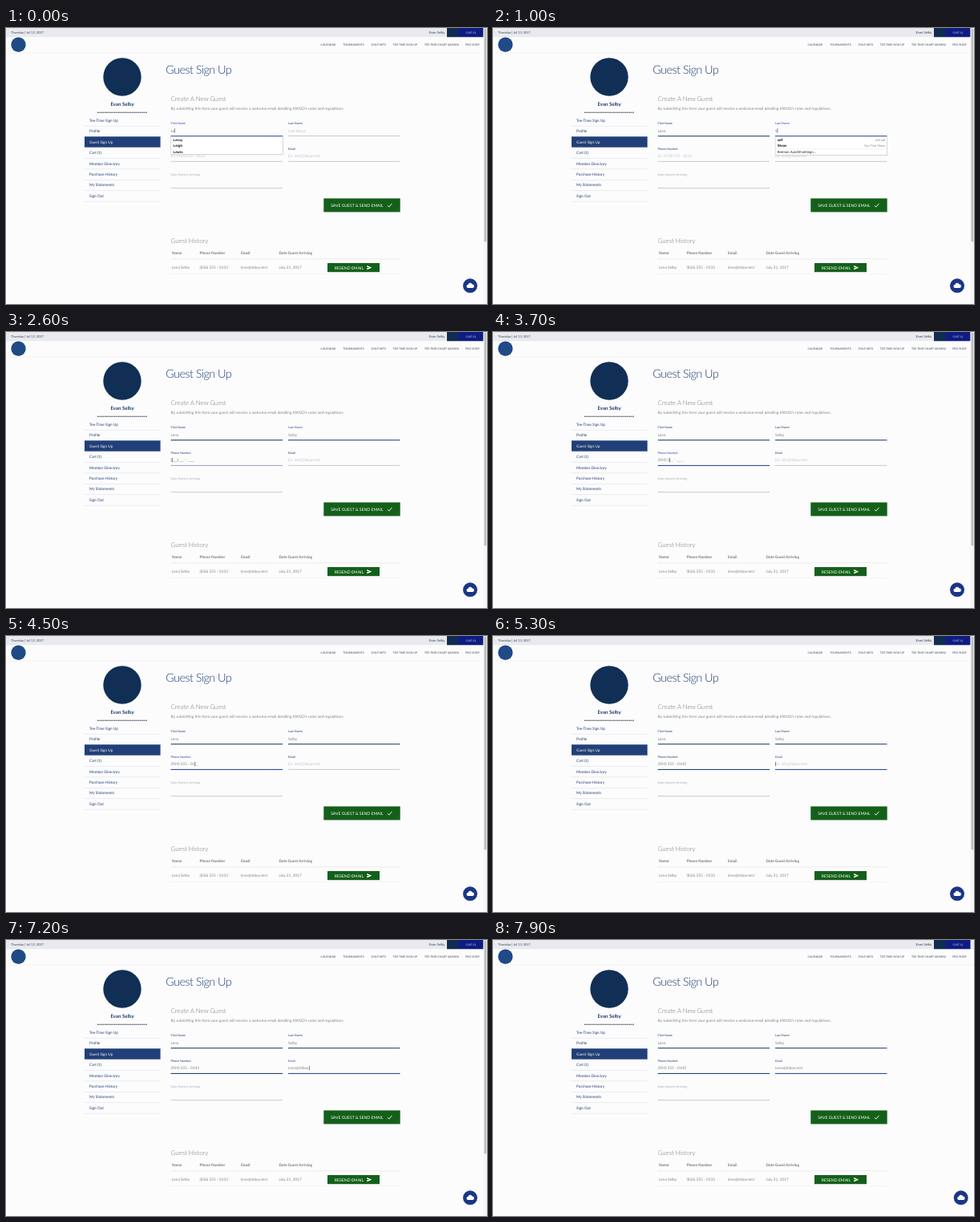
An HTML page that plays this animation: 600 px wide and 344 px high, repeating every 8 s.

```html
<!DOCTYPE html>
<html lang="en">
<head>
<meta charset="utf-8">
<title>Guest Sign Up</title>
<style>
  html, body { margin: 0; width: 100%; height: 100%; overflow: hidden; background: #fcfcfd; }
  svg { display: block; width: 600px; height: 344px; }
  text { font-family: Lato, "Open Sans", sans-serif; text-rendering: geometricPrecision; white-space: pre; }
  .menu text { font-family: "Liberation Sans", Arial, sans-serif; }
</style>
</head>
<body>
<svg id="stage" viewBox="0 0 600 344" xmlns="http://www.w3.org/2000/svg"></svg>
<script>
const LOOP = 8000;
const NAVY = '#1d3c70', GREY = '#808285', PALE = '#c3c5c9', GREEN = '#14601b';
const stage = document.getElementById('stage');

function add(parent, tag, attrs) {
  const el = document.createElementNS('http://www.w3.org/2000/svg', tag);
  for (const key in attrs) el.setAttribute(key, attrs[key]);
  return parent.appendChild(el);
}
const rect = (x, y, width, height, fill, parent = stage, more = {}) =>
  add(parent, 'rect', { x, y, width, height, fill, ...more });
const circle = (cx, cy, r, fill, parent = stage) => add(parent, 'circle', { cx, cy, r, fill });
const path = (d, fill, parent = stage, more = {}) => add(parent, 'path', { d, fill, ...more });
function label(str, x, y, size, fill, more = {}, parent = stage) {
  const el = add(parent, 'text', { x, y, 'font-size': size, fill, ...more });
  el.textContent = str;
  return el;
}
const BOLD = { 'font-weight': 700 }, LIGHT = { 'font-weight': 300 };
const show = (el, on) => el.setAttribute('visibility', on ? 'visible' : 'hidden');

// Header
rect(0, 0, 600, 11.3, '#e8eaed');
label('Thursday | Jul 13, 2017', 6.2, 6.5, 4, '#39445a');
label('Evan Selby', 527.6, 6.5, 4.2, '#39445a');
rect(550, 0, 14, 11.3, '#102c50');
rect(564, 0, 31.5, 11.3, '#111c80');
label('CART (0)', 573.4, 6.6, 3.3, '#c4cbea');
rect(0, 30.8, 600, 0.5, '#e6e7ea');
circle(15.5, 20.7, 9.2, '#1f4a86');
[['CALENDAR', 392.6], ['TOURNAMENTS', 420.2], ['GOLF INFO', 455.6], ['TEE-TIME SIGN UP', 482.8],
 ['TEE-TIME CHART (ADMIN)', 522], ['PRO SHOP', 573.2]]
  .forEach(([s, x]) => label(s, x, 22.4, 3.53, '#38404f'));

// Sidebar
circle(145, 61, 23.7, '#112f55');
label('Evan Selby', 145, 97.4, 6.1, NAVY, { ...BOLD, 'text-anchor': 'middle' });
path('M114 105.2H176.3', 'none', stage,
  { stroke: '#1b2a44', 'stroke-width': 1.1, 'stroke-dasharray': '1.7 0.8' });
rect(98, 135.3, 94.6, 13.4, '#213f78');
['Tee-Time Sign Up', 'Profile', 'Guest Sign Up', 'Cart (1)', 'Member Directory',
 'Purchase History', 'My Statements', 'Sign Out'].forEach((s, i) => {
  const y = 116.8 + i * 13.43;
  label(s, 104, y, 4.7, i === 2 ? '#fff' : NAVY);
  if (i !== 1 && i !== 2) rect(98, y + 5.1, 94.6, 0.5, '#d9dbe0');
});

// Headings
label('Guest Sign Up', 199.2, 57.4, 14.5, NAVY, { ...LIGHT, 'letter-spacing': -0.6 });
label('Create A New Guest', 205.6, 91.4, 8, '#6d7076', { ...LIGHT, 'letter-spacing': -0.1 });
label('By submitting this form your guest will receive a welcome email detailing KWUD\'s rules and regulations.',
  205.6, 102.4, 4.77, GREY);
label('Guest History', 205.6, 267.8, 8, '#6d7076', { ...LIGHT, 'letter-spacing': -0.1 });

// Buttons
rect(396.3, 212.4, 95.4, 17, GREEN);
label('SAVE GUEST & SEND EMAIL', 405.2, 222.8, 5.07, '#fff');
path('M476 221.2l1.8 1.9 3.6-4.3', 'none', stage, { stroke: '#fff', 'stroke-width': 0.9 });
rect(401, 293, 65, 11.2, GREEN);
label('RESEND EMAIL', 409.8, 300.5, 5.15, '#fff');
path('M450.3 296.1l6 2.6-6 2.6v-2l3.6-.6-3.6-.6z', '#fff');

// Guest history
const cols = [207, 241.5, 293, 340.6];
['Name', 'Phone Number', 'Email', 'Date Guest Arriving']
  .forEach((s, i) => label(s, cols[i], 281.8, 4.72, '#74777d', BOLD));
['Lena Selby', '(836) 555 - 0133', 'lena@inbox.test', 'July 21, 2017']
  .forEach((s, i) => label(s, cols[i], 300.4, 4.75, GREY));
rect(205.6, 287.6, 286, 0.6, '#dcdde0');
rect(205.6, 306.6, 286, 0.4, '#e8e9ec');

// Form fields: focus and blur times, plus the time of each keystroke
const MASK = '(___) ___ - ____';
const fields = [
  { x: 205.6, y: 134.2, name: 'First Name', hint: '', text: 'Lena',
    keys: [-400, -200, 200, 350], focus: -900, blur: 550 },
  { x: 352, y: 134.2, name: 'Last Name', hint: 'Last Name', text: 'Selby',
    keys: [950, 1150, 1350, 1550, 1750], focus: 550, blur: 2500 },
  { x: 205.6, y: 165.9, name: 'Phone Number', hint: 'Ex: (958) 555 - 0123', text: '9045550143', mask: true,
    keys: [2950, 3150, 3350, 3650, 3850, 4050, 4250, 4400, 4550, 4700], focus: 2500, blur: 5000 },
  { x: 352, y: 165.9, name: 'Email', hint: 'Ex: info@inbox.test', text: 'Lena@inbox.test',
    keys: [5600, 5800, 6000, 6200, 6500, 6650, 6760, 6870, 6980, 7090, 7200, 7310, 7420, 7530, 7640],
    focus: 5000, blur: Infinity },
];
for (const f of fields) {
  f.title = label(f.name, f.x, f.y - 14, 3.8, NAVY);
  f.value = label('', f.x, f.y - 4.7, 4.75, GREY);
  f.line = rect(f.x, f.y, 139.5, 0.6, '#a9abb0');
  f.caret = rect(f.x, f.y - 9, 0.5, 5.4, '#222');
}
label('Date Guest Is Arriving', 205.6, 184.2, 3.78, '#a3a5aa');
rect(205.6, 199.2, 139.5, 0.6, '#a9abb0');

// Suggestion menus
function menu(x, height) {
  const g = add(stage, 'g', { class: 'menu' });
  rect(x + 0.4, 136, 139.6, height + 0.4, '#dcdde0', g);
  rect(x, 135.6, 139.5, height, '#fff', g, { stroke: '#bfc1c5', 'stroke-width': 0.5 });
  return g;
}
const firstMenu = menu(205.8, 22);
['Leroy', 'Leigh', 'Lewis'].forEach((s, i) =>
  label(s, 208.6, 140.9 + i * 7.5, 4.3, '#111', BOLD, firstMenu));
const lastMenu = menu(352.1, 22.6);
[['sdf', 'def sdf'], ['Show', 'Our First Show']].forEach(([s, note], i) => {
  const y = 140.9 + i * 7.4;
  label(s, 354.7, y, 4.3, '#111', BOLD, lastMenu);
  label(note, 489, y, 3.9, '#85878c', { 'text-anchor': 'end' }, lastMenu);
});
rect(352.3, 150.7, 139.1, 0.4, '#dcdde0', lastMenu);
label('Bremon Autofill settings...', 354.7, 156.1, 4.3, '#222', {}, lastMenu);

// Scrollbar and floating button
const bar = add(stage, 'g', {});
rect(595.6, 0, 4.4, 344, '#f5f5f6', bar);
rect(596.5, 0.6, 2.8, 266, '#bcbdc0', bar, { rx: 1.4 });
const cloud = add(stage, 'g', {});
circle(0, 0.4, 9.2, '#d5d8e2', cloud);
circle(0, 0, 8.9, '#1b3587', cloud);
path('M-2.4 2.7a2 2 0 0 1-.3-4 2.9 2.9 0 0 1 5.4-.4 2.2 2.2 0 0 1 .1 4.4z', '#fff', cloud);

const clamp = v => Math.max(0, Math.min(1, v));
const mix = (a, b, k) => `rgb(${a.map((v, i) => Math.round(v + (b[i] - v) * k))})`;
const IDLE = [169, 171, 176], ACTIVE = [45, 72, 170], DONE = [42, 66, 108], INK = [29, 60, 112];

function drawField(f, t) {
  const typed = f.keys.filter(k => k <= t).length;
  const focused = t >= f.focus && t < f.blur;
  const on = clamp((t - f.focus) / 300), off = clamp((t - f.blur) / 300);
  let str = f.text.slice(0, typed), caretAt = str.length;
  if (f.mask && t >= f.focus) {
    let n = 0;
    str = MASK.replace(/_/g, c => n < typed ? f.text[n++] : c);
    caretAt = str.indexOf('_');
    if (caretAt < 0) caretAt = str.length;
  }
  const shown = str || f.hint;
  if (f.value.textContent !== shown) f.value.textContent = shown;
  f.value.setAttribute('fill', str ? (f.mask && !typed ? '#55585e' : GREY) : PALE);
  f.line.setAttribute('fill', off ? mix(ACTIVE, DONE, off) : mix(IDLE, ACTIVE, on));
  f.line.setAttribute('height', 0.6 + 0.5 * on);
  f.title.setAttribute('fill', mix(INK, ACTIVE, on - off));

  const lastKey = Math.max(f.focus, ...f.keys.filter(k => k <= t));
  show(f.caret, focused && t < 7800 && (t - lastKey) % 1000 < 500);
  const w = caretAt ? f.value.getSubStringLength(0, caretAt) : 0;
  f.caret.setAttribute('x', f.x + w + 0.1);
}

function draw(t) {
  fields.forEach(f => drawField(f, t));
  show(firstMenu, t < 200);
  show(lastMenu, t >= 950 && t < 1150);
  const wide = t >= 7700;
  show(bar, !wide);
  cloud.setAttribute('transform', `translate(${wide ? 583.7 : 579} 321.2)`);
}

function tick() {
  draw(performance.now() % LOOP);
  requestAnimationFrame(tick);
}
draw(0);
tick();
</script>
</body>
</html>
```
